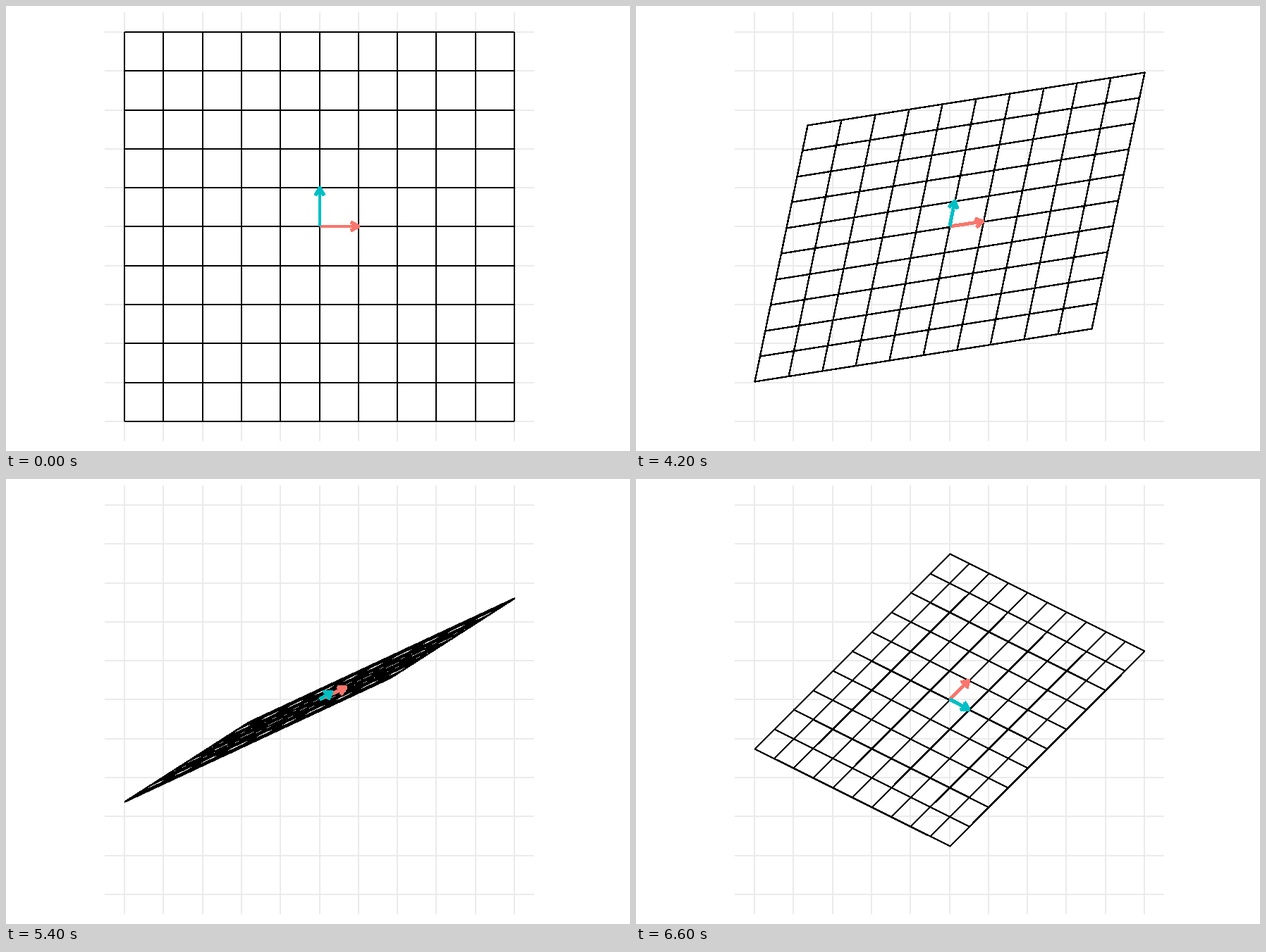
Animation, 885 px wide and 632 px high, one loop 10 s. Source, as a matplotlib script:

```python
import numpy as np
import matplotlib.pyplot as plt
from matplotlib.animation import FuncAnimation
from matplotlib.collections import LineCollection

WIDTH, HEIGHT, DPI = 885, 632, 100
ORIGIN = np.array([444.5, 313.5])
UNIT = 55.3
HALF = 5
FRAMES, INTERVAL = 100, 100
HOLD, STEPS = 33, 33
END_MATRIX = np.array([[0.5, 0.5], [0.5, -0.25]])
HEAD_LENGTH, HEAD_ANGLE = 12, np.radians(30)


def px(width):
    return width * 72 / DPI


def to_pixels(points):
    return ORIGIN + np.asarray(points) * [UNIT, -UNIT]


def snap(pixels):
    """Round to whole pixels, halves going right and up."""
    return np.stack([np.floor(pixels[..., 0] + 0.5),
                     np.ceil(pixels[..., 1] - 0.5)], axis=-1)


def grid_segments(reach):
    ticks = range(-HALF, HALF + 1)
    return np.array([[(k, -reach), (k, reach)] for k in ticks]
                    + [[(-reach, k), (reach, k)] for k in ticks], float)


def make_lines(color, zorder):
    lines = LineCollection([], colors=color, linewidths=px(2), zorder=zorder,
                           antialiaseds=False, capstyle="butt")
    lines.set_snap(False)
    return ax.add_collection(lines, autolim=False)


def make_arrow(color, zorder):
    line, = ax.plot([], [], color=color, lw=px(4), zorder=zorder,
                    antialiased=False, solid_capstyle="butt",
                    solid_joinstyle="round")
    line.set_snap(False)
    return line


def arrow_path(vector):
    base, tip = to_pixels([(0, 0), vector])
    dx, dy = base - tip
    back = np.arctan2(dy, dx)
    barbs = [tip + HEAD_LENGTH * np.array([np.cos(a), np.sin(a)])
             for a in (back - HEAD_ANGLE, back + HEAD_ANGLE)]
    gap = [np.nan, np.nan]
    return snap(np.array([base, tip, gap, barbs[0], tip, barbs[1]]))


fig = plt.figure(figsize=(WIDTH / DPI, HEIGHT / DPI), dpi=DPI,
                 facecolor="white")
ax = fig.add_axes([0, 0, 1, 1])
ax.set_axis_off()

backdrop = make_lines("#EBEBEB", 1)
backdrop.set_segments(snap(to_pixels(grid_segments(HALF + 0.5))))
mesh = make_lines("black", 2)
arrows = [make_arrow("#F8766D", 3), make_arrow("#00BFC4", 4)]
ax.set(xlim=(0, WIDTH), ylim=(HEIGHT, 0))

GRID = grid_segments(HALF)


def update(frame):
    t = np.clip(frame - HOLD, 0, STEPS) / STEPS
    matrix = (1 - t) * np.eye(2) + t * END_MATRIX

    segments = snap(to_pixels(GRID @ matrix.T))
    # Slanted lines are thin and run through pixel centres.
    slanted = t > 0
    mesh.set_segments(segments + 0.5 * slanted)
    mesh.set_linewidth(px(1.25 if slanted else 2))

    for arrow, vector in zip(arrows, matrix.T):
        arrow.set_data(*arrow_path(vector).T)
    return [mesh, *arrows]


animation = FuncAnimation(fig, update, frames=FRAMES, interval=INTERVAL,
                          repeat=True, repeat_delay=0, blit=False)
plt.show()
```
